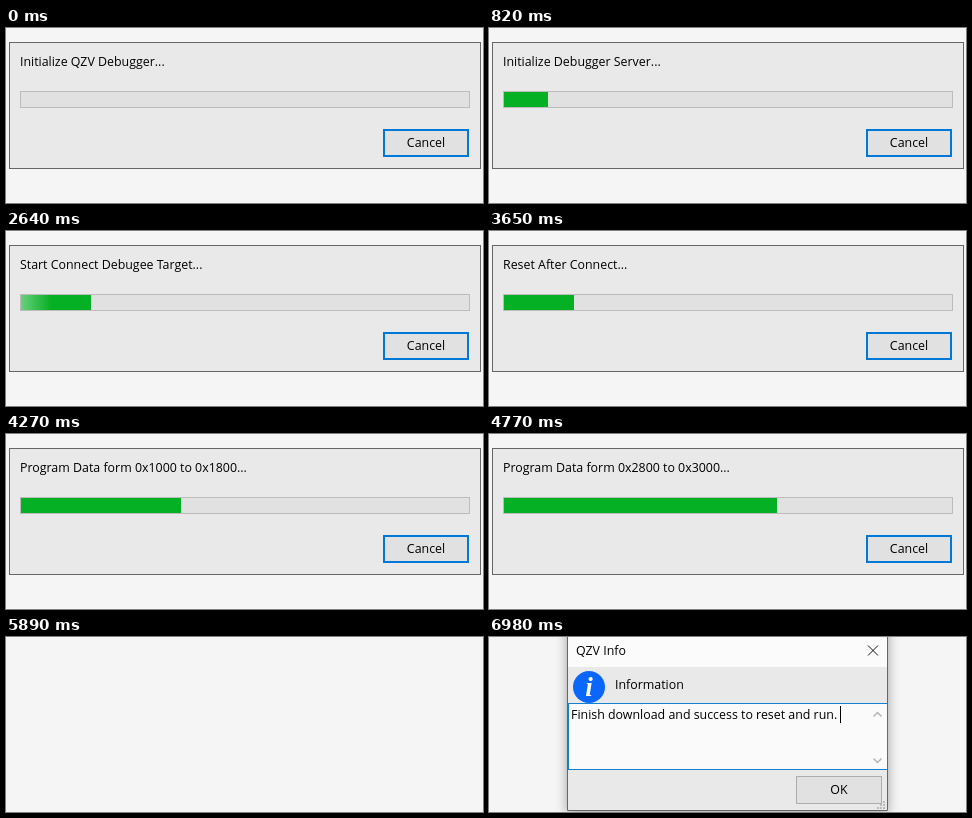
An HTML page that plays this animation: 477 by 175 pixels, repeating every 7.38 s.

```html
<!DOCTYPE html>
<html lang="en">
<head>
<meta charset="utf-8">
<title>Download progress</title>
<style>
  html, body { margin: 0; width: 100%; height: 100%; overflow: hidden; background: #f5f5f5; }
  svg { display: block; width: 477px; height: 175px; }
  text { font: 12.4px "Open Sans", "Noto Sans", sans-serif; fill: #000; }
  .mid { text-anchor: middle; }
  .panel { fill: #e9e9e9; }
  .line { fill: none; stroke: #666; }
  #info { transform-origin: 239px 75px; }
  #info > .window { filter: drop-shadow(0 2px 6px rgba(0, 0, 0, .35)); }
</style>
</head>
<body>
<svg viewBox="0 0 477 175">
  <defs>
    <linearGradient id="shine">
      <stop offset="0" stop-color="#fff" stop-opacity="0"/>
      <stop offset=".5" stop-color="#fff" stop-opacity=".4"/>
      <stop offset="1" stop-color="#fff" stop-opacity="0"/>
    </linearGradient>
    <clipPath id="filled"><rect id="clip" x="15" y="64" height="15"/></clipPath>
  </defs>
  <rect width="477" height="175" fill="#f5f5f5"/>

  <g id="progress">
    <rect class="panel" x="3.5" y="14.5" width="471" height="126" stroke="#666"/>
    <text id="status" x="14" y="38"></text>
    <rect x="14.5" y="63.5" width="449" height="16" fill="#e1e1e1" stroke="#bcbcbc"/>
    <rect id="bar" x="15" y="64" height="15" fill="#06b025"/>
    <g clip-path="url(#filled)"><rect id="glow" y="64" width="60" height="15" fill="url(#shine)"/></g>
    <rect x="378" y="102" width="84" height="26" fill="#e1e1e1" stroke="#0078d7" stroke-width="2"/>
    <text class="mid" x="420" y="119">Cancel</text>
  </g>

  <g id="info">
    <rect class="window" x="78" y="-10" width="321" height="184" fill="#fbfbfb"/>
    <rect class="panel" x="79" y="30" width="319" height="143"/>
    <path class="line" d="M78.5 -10V173.5H398.5V-10"/>
    <text x="87" y="18">QZV Info</text>
    <path d="M379 8.5l10 10m0-10l-10 10" stroke="#111" fill="none"/>
    <circle cx="100" cy="50" r="16" fill="#0a67fa"/>
    <text class="mid" x="100" y="59" style="font:italic bold 27px 'Liberation Serif',serif;fill:#fff">i</text>
    <text x="126" y="52">Information</text>
    <rect x="79.5" y="66.5" width="319" height="66" fill="#fafafa" stroke="#1580d0"/>
    <text x="82" y="82">Finish download and success to reset and run.</text>
    <rect id="caret" x="351" y="69" width="1" height="17"/>
    <path d="M384.5 79.5l4-4 4 4M384.5 121.5l4 4 4-4" fill="none" stroke="#b4b4b4" stroke-width="1.5"/>
    <rect x="307.5" y="139.5" width="85" height="27" fill="#e1e1e1" stroke="#adadad"/>
    <text class="mid" x="350" y="157">OK</text>
    <path d="M394 164h2v2h-2zM391 167h2v2h-2zM394 167h2v2h-2zM388 170h2v2h-2zM391 170h2v2h-2zM394 170h2v2h-2z" fill="#bbb"/>
  </g>
</svg>
<script>
const LOOP = 7380;
const $ = id => document.getElementById(id);

// Runs of evenly spaced screen updates: start, end, number of steps
const runs = [[200, 820, 7], [1320, 1840, 6], [2040, 2040, 1], [2640, 2950, 4],
  [3650, 3750, 2], [3950, 4670, 8], [4770, 5490, 8], [5590, 6190, 7],
  [6480, 6480, 1], [6980, 6980, 1]];
const ticks = [0];
for (const [a, b, n] of runs)
  for (let i = 0; i < n; i++) ticks.push(n > 1 ? Math.round(a + (b - a) * i / (n - 1)) : a);

// Right edge of the bar over time
const edges = [[0, 15], [200, 15], [820, 59], [1320, 59], [1840, 81], [2040, 85],
  [3850, 85], [4770, 288], [5390, 324], [5490, 328], [5790, 342]];

const range = (from, to) => `Program Data form 0x${from.toString(16)} to 0x${to.toString(16)}...`;
const captions = [
  [0, "Initialize QZV Debugger..."],
  [200, "Initialize Debugger Server..."],
  [1320, "Start Connect Debugee Target..."],
  [3650, "Reset After Connect..."]
];
[3750, 3950, 4150, 4350, 4550, 4765, 4865, 4970, 5070].forEach((time, i) =>
  captions.push([time, range(i * 0x800, (i + 1) * 0x800)]));
captions.push([5175, range(0x4800, 0x4b58)], [5380, range(0x4b58, 0x4bf0)]);

const lastBefore = (list, t) => list.filter(([time]) => time <= t).pop();

function edgeAt(t) {
  const i = edges.findIndex(([time]) => time > t);
  if (i < 0) return edges[edges.length - 1][1];
  const [t0, x0] = edges[i - 1], [t1, x1] = edges[i];
  return Math.round(x0 + (x1 - x0) * (t - t0) / (t1 - t0));
}

function draw(now) {
  const time = now % LOOP;
  const t = ticks.filter(tick => tick <= time).pop();

  const width = edgeAt(t) - 15;
  $("bar").setAttribute("width", width);
  $("clip").setAttribute("width", width);
  $("status").textContent = lastBefore(captions, t)[1];

  const shining = t >= 2640 && t < 2950;
  $("glow").setAttribute("opacity", shining ? 1 : 0);
  $("glow").setAttribute("x", -15 + (t - 2640) * 0.28);

  $("progress").setAttribute("opacity", t < 5790 ? 1 : t < 5890 ? 0.35 : 0);

  const shown = Math.min(1, Math.max(0, (t - 5890) / 300));
  const eased = 1 - (1 - shown) ** 2;
  $("info").setAttribute("opacity", eased);
  $("info").style.transform = shown < 1 ? `scale(${0.9 + 0.1 * eased})` : "none";
  $("caret").setAttribute("opacity", t >= 6480 && t < 6980 ? 0 : 1);
}

const start = performance.now();
function frame() {
  draw(performance.now() - start);
  requestAnimationFrame(frame);
}
frame();
</script>
</body>
</html>
```
